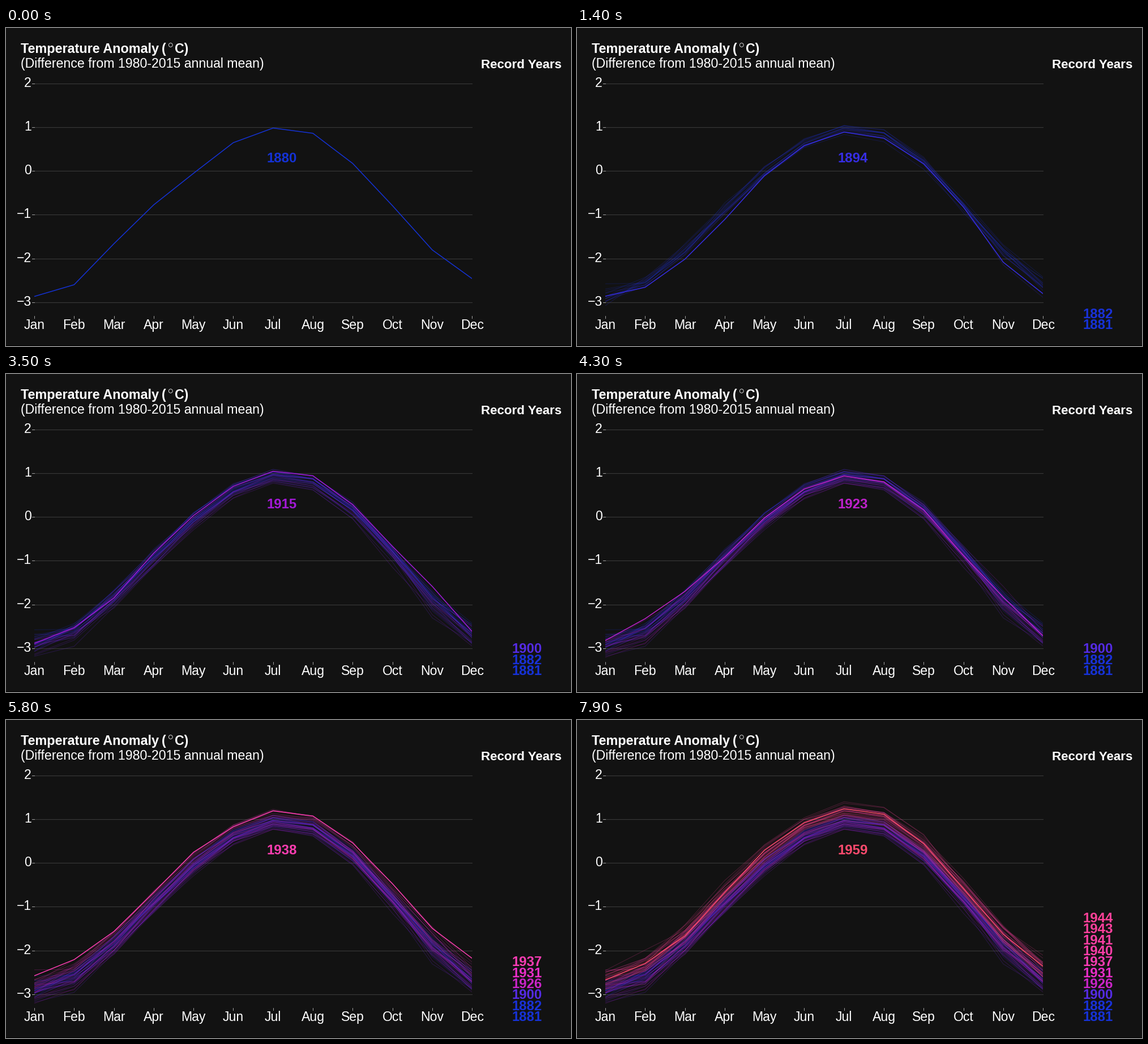
Animation, 998 px wide and 561 px high, one loop 8 s. Source, as a matplotlib script:

```python
import matplotlib.pyplot as plt
import numpy as np
from matplotlib.animation import FuncAnimation
from matplotlib.colors import LinearSegmentedColormap
from matplotlib.patches import Circle, Rectangle

W, H, DPI = 998, 561, 64
PT = 72 / DPI                      # points per pixel
LEFT, STEP = 50, 70.3              # January position, month spacing
ZERO, UNIT = 252.2, 77.2           # pixel row of 0 degrees, pixels per degree
BOTTOM = 508
FIRST, COUNT = 1880, 80
MONTHS = "Jan Feb Mar Apr May Jun Jul Aug Sep Oct Nov Dec".split()
RIGHT = LEFT + STEP * (len(MONTHS) - 1)
RECORDS = [1881, 1882, 1900, 1926, 1931, 1937, 1940, 1941, 1943, 1944]

# Turning points of the annual anomaly: year, degrees
TREND = [(1880, -.20), (1882, -.13), (1886, -.32), (1889, -.16), (1894, -.32),
         (1900, -.12), (1904, -.44), (1906, -.27), (1909, -.45), (1915, -.15),
         (1917, -.43), (1926, -.13), (1929, -.30), (1931, -.09), (1940, .07),
         (1944, .18), (1950, -.15), (1953, .06), (1956, -.18), (1959, .03)]

COLORS = LinearSegmentedColormap.from_list("years", [
    (0.00, "#1432d6"), (0.18, "#372de4"), (0.30, "#692ae6"), (0.44, "#a319d8"),
    (0.58, "#c823c8"), (0.65, "#eb2dc8"), (0.72, "#fa3cb4"), (0.82, "#ff4196"),
    (1.00, "#ff4b6e")])

plt.rcParams["font.family"] = "Liberation Sans"


def row(deg):
    return ZERO - UNIT * deg


def color(year):
    return COLORS((year - FIRST) / (COUNT - 1))


def seasons():
    """Two harmonics, the annual trend and noise that is larger in winter."""
    rng = np.random.default_rng(4)
    a = np.arange(12) * np.pi / 6
    cycle = (-0.68 - 1.94 * np.cos(a) - 0.057 * np.sin(a)
             - 0.064 * np.cos(2 * a) + 0.079 * np.sin(2 * a))
    annual = np.interp(FIRST + np.arange(COUNT), *zip(*TREND))
    noise = rng.normal(size=(COUNT, 12))
    noise += 0.5 * np.roll(noise, 1, axis=1)
    noise -= noise.mean(axis=1, keepdims=True)
    return cycle + annual[:, None] + noise * (0.065 + 0.04 * np.cos(a))


fig = plt.figure(figsize=(W / DPI, H / DPI), dpi=DPI, facecolor="#121212")
ax = fig.add_axes([0, 0, 1, 1])
ax.set(xlim=(0, W), ylim=(H, 0))
ax.axis("off")


def label(x, base, text, size=23, col="white", **kw):
    return ax.text(x, base, text, fontsize=size * PT, color=col,
                   va="baseline", **kw)


def stroke(x, y, col, width=1.0, **kw):
    return ax.plot(x, y, color=col, lw=width * PT, **kw)[0]


# Titles
label(26, 43.5, "Temperature Anomaly", 23.4, weight="bold")
label(275, 43.5, "(", weight="bold")
ax.add_patch(Circle((290.8, 30), 3.4, fill=False, ec="white", lw=0.8 * PT))
label(298, 43.5, "C)", weight="bold")
label(26, 69.5, "(Difference from 1980-2015 annual mean)", 23.1)
label(910, 70.5, "Record Years", 22.4, weight="bold", ha="center")

# Axes
for deg in range(-3, 3):
    y = row(deg)
    stroke([LEFT, RIGHT], [y, y], "#383838", 1.2, zorder=1)
    stroke([46.5, LEFT], [y, y], "#b0b0b0", 0.9, zorder=1)
    label(45, y + 6, str(deg).replace("-", "\u2212"), ha="right")
for i, name in enumerate(MONTHS):
    x = LEFT + i * STEP
    stroke([x, x], [BOTTOM, BOTTOM + 3.5], "#b0b0b0", 0.9, zorder=1)
    label(x, 531, name, ha="center")
ax.add_patch(Rectangle((0, H - 1), W, 1, color="black", lw=0))

# One line per year
plot_area = Rectangle((LEFT, 80), RIGHT - LEFT, BOTTOM - 80,
                      transform=ax.transData)
months = LEFT + STEP * np.arange(12)
lines = []
for i, temps in enumerate(seasons()):
    line = stroke(months, row(temps), color(FIRST + i))
    line.set_clip_path(plot_area)
    lines.append(line)

year_text = label(487, 237, "", 24, weight="bold", ha="center", zorder=5)
records = [label(920.5, 531 - 19.33 * i, str(year), 24, color(year),
                 weight="bold", ha="center")
           for i, year in enumerate(RECORDS)]


def update(n):
    year = FIRST + n
    for i, line in enumerate(lines):
        now = i == n
        line.set(visible=i <= n, alpha=1 if now else 0.24,
                 linewidth=(1.5 if now else 1) * PT, zorder=3 if now else 2)
    year_text.set(text=str(year), color=color(year))
    for mark, record in zip(records, RECORDS):
        mark.set_visible(record <= year)
    return [*lines, year_text, *records]


anim = FuncAnimation(fig, update, frames=COUNT, interval=100,
                     init_func=lambda: update(0), repeat=True, repeat_delay=0)
plt.show()
```
